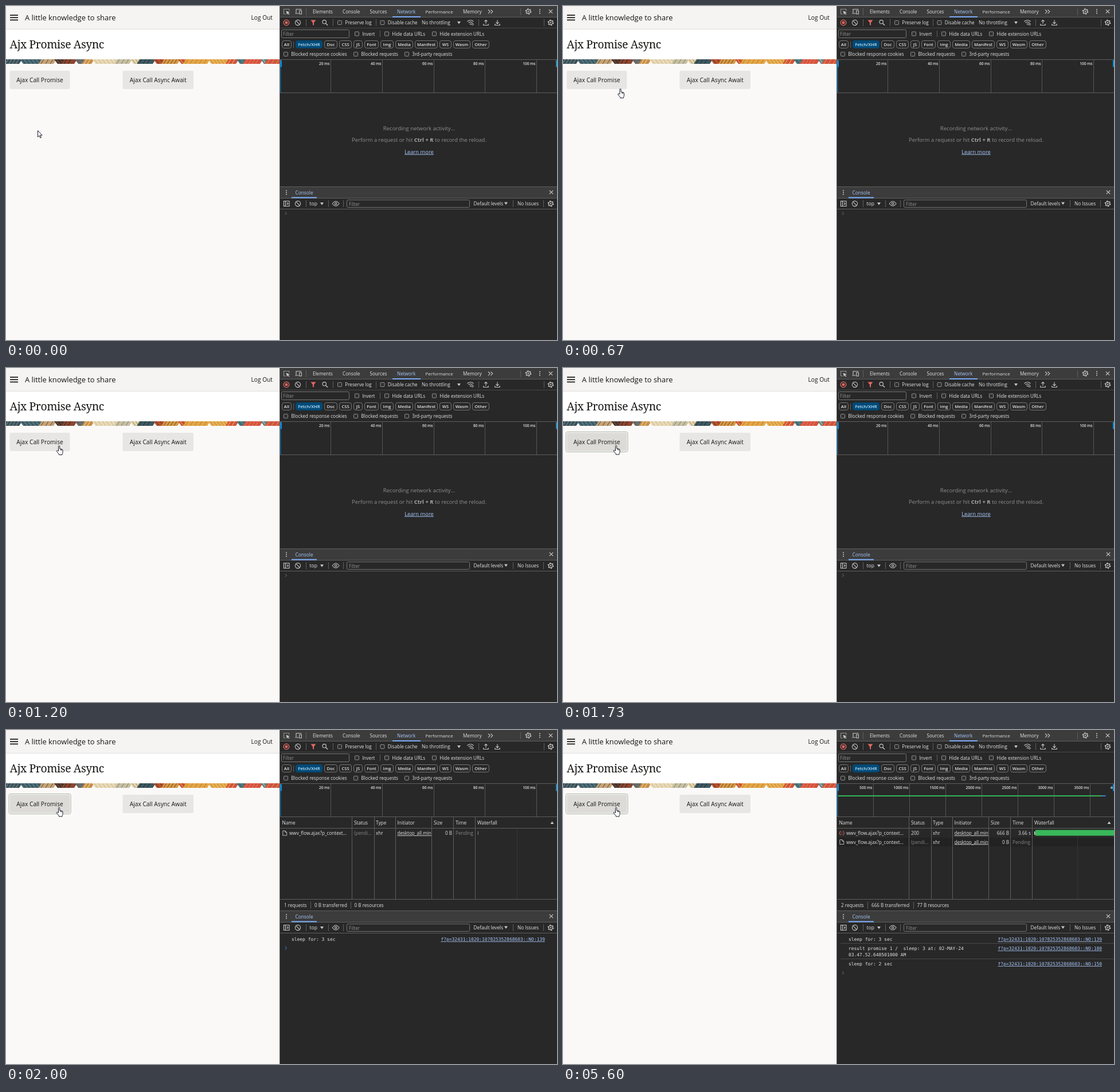
Recreate the animation shown at these times as an HTML page. Size 961 by 583 pixels, loop 8000 ms.

```html
<!DOCTYPE html>
<html lang="en">
<head>
<meta charset="utf-8">
<title>Ajx Promise Async</title>
<style>
html, body { margin: 0; width: 100%; height: 100%; overflow: hidden; background: #282828; }
svg { display: block; width: 100%; height: 100%; }
text { font-family: "Open Sans", "Noto Sans", sans-serif; white-space: pre; }
.serif { font-family: "Noto Serif", "Liberation Serif", serif; letter-spacing: -.38px; }
.mono { font-family: "DejaVu Sans Mono", "Liberation Mono", monospace; }
.link { text-decoration: underline; }
</style>
</head>
<body>
<svg id="stage" viewBox="0 0 961 583" xmlns="http://www.w3.org/2000/svg"></svg>
<script>
const LOOP = 8000;
const INK = '#161513', PANEL = '#282828', BAR = '#3c3c3c', LINE = '#5e5e5e';
const FG = '#e3e3e3', ICON = '#c7c7c7', DIM = '#8f8f8f', BLUE = '#7cacf8', LINK = '#a8c7fa', RED = '#e46962';

// markup helpers
const rect = (x, y, w, h, fill, more = '') =>
  `<rect x="${x}" y="${y}" width="${w}" height="${h}" fill="${fill}" ${more}/>`;
const hline = (x, y, w, c = LINE) => rect(x, y, w, 1, c);
const vline = (x, y, h, c = LINE) => rect(x, y, 1, h, c);
const text = (x, y, s, { size = 8.15, fill = FG, anchor = 'start', weight = 400, cls = '' } = {}) =>
  `<text x="${x}" y="${y}" font-size="${size}" fill="${fill}" text-anchor="${anchor}" font-weight="${weight}" class="${cls}">${s}</text>`;
const stroke = (d, c = ICON, w = 1.1, fill = 'none') =>
  `<path d="${d}" fill="${fill}" stroke="${c}" stroke-width="${w}"/>`;
const shape = (d, c = ICON) => `<path d="${d}" fill="${c}"/>`;
const ring = (x, y, r, c = ICON, w = 1.1, more = '') =>
  `<circle cx="${x}" cy="${y}" r="${r}" fill="none" stroke="${c}" stroke-width="${w}" ${more}/>`;
const group = (id, body) => `<g id="${id}">${body}</g>`;

// icons
const gear = (x, y) => ring(x, y, 3.6, ICON, 1.2) + ring(x, y, 4.7, ICON, 1.3, 'stroke-dasharray="2.2 2.72"') + ring(x, y, 1.1, ICON, 1);
const dots = (x, y) => [-3.3, 0, 3.3].map(d => `<circle cx="${x}" cy="${y + d}" r="1" fill="${ICON}"/>`).join('');
const cross = (x, y) => stroke(`M${x - 3.2} ${y - 3.2}l6.4 6.4m0-6.4l-6.4 6.4`, ICON, 1.2);
const clear = (x, y) => ring(x, y, 4.6) + stroke(`M${x - 3.2} ${y - 3.2}l6.4 6.4`);
const caret = (x, y) => shape(`M${x - 3} ${y - 2}h6l-3 4.4z`);
const box = (x, y) => rect(x - 3.5, y - 3.5, 7, 7, '#303030', `rx="1" stroke="${DIM}"`);
const check = (x, y, label) => box(x, y) + text(x + 9.3, y + 3.2, label);
const arrowTray = (x, y, dir) =>
  stroke(`M${x - 4.2} ${y + 2}v2.5h8.4v-2.5M${x} ${y + 2}v-6.5` +
    (dir < 0 ? `m-2.6 2.7l2.6-2.7l2.6 2.7` : `m-2.6 3.9l2.6 2.6l2.6-2.6`));
const prompt = (id, y, c) => group(id, stroke(`M487 ${y - 2.6}l2.5 2.6l-2.5 2.6`, c, 1));
const fileIcon = y => stroke(`M482.8 ${y - 4}h4.2l2.7 2.7v5.3h-6.9zM487 ${y - 4}v2.7h2.7`, ICON, .9);
const jsonIcon = y => stroke(`M484.6 ${y - 3.6}q-1.5 0-1.4 1.5t-1.3 2.1q1.4.4 1.3 2t1.4 1.6M488.2 ${y - 3.6}q1.5 0 1.4 1.5t1.3 2.1q-1.4.4-1.3 2t-1.4 1.6`, RED, 1) +
  rect(485.8, y - 2, 1.2, 1.3, RED) + rect(485.8, y + 1, 1.2, 1.3, RED);

// decorative strip: [start, colour, hatch colour]
const STRIP = [
  [-6, '#3d5058', '#6f8a8c'], [24, '#4f7079', '#2f3f47'], [62, '#c4a57a', '#7e5c3c'], [84, '#43352f', '#8a4a31'],
  [102, '#8d4630', '#3b2d29'], [120, '#5b7478', '#a5472f'], [137, '#c98f45', '#e6d3a4'], [150, '#e8dab8', '#d0bc8e'],
  [194, '#c8c0a4', '#8f8f78'], [216, '#e6d6b0', '#b39a6a'], [233, '#3f5960', '#27383f'], [257, '#b5532f', '#7b3326'],
  [276, '#d69a45', '#8e5a2c'], [300, '#c64f35', '#e2a44a'], [314, '#e2a747', '#c9822f'], [352, '#e6b256', '#d08935'],
  [388, '#d0533c', '#edb05c'], [402, '#4f7c80', '#365b63'], [418, '#d5533f', '#e8795a'], [444, '#5c8585', '#c9c0a5'], [456, '#cf5340', '#e48a4e']
];
function strip() {
  let out = '';
  STRIP.forEach(([x, base, hatch], i) => {
    const end = i + 1 < STRIP.length ? STRIP[i + 1][0] : 486;
    const lean = i % 2 ? 6 : -5;
    out += shape(`M${x} 93H${end + 4}l${lean} 8H${x + lean}z`, base);
    for (let k = x + 4; k < end - 1; k += 6 + i % 3)
      out += stroke(`M${k} 93l${lean} 8`, hatch, 1.2);
  });
  return `<svg x="0" y="93" width="477" height="8" viewBox="0 93 477 8">${out}</svg>`;
}

const button = (x, w, fill, label) => rect(x, 113, w, 32, fill, 'rx="2"') +
  text(x + w / 2, 132.5, label, { size: 10.2, fill: INK, anchor: 'middle', weight: 500 });

function page() {
  return rect(0, 0, 477, 583, '#fbf9f8') + rect(0, 0, 477, 40, '#f5f4f2') + hline(0, 40, 477, '#e1dfdc') +
    rect(0, 41, 477, 52, '#fff') + strip() +
    [15.2, 19.4, 23.6].map(y => rect(7, y, 14, 1.7, INK)).join('') +
    text(33, 25, 'A little knowledge to share', { size: 12.9, fill: INK, weight: 500 }) +
    text(427.5, 24, 'Log Out', { size: 10.2, fill: INK }) +
    text(6.5, 74, 'Ajx Promise Async', { size: 19.3, fill: INK, cls: 'serif' }) +
    button(6.5, 105, '#e7e6e4', 'Ajax Call Promise') + button(203.5, 123.5, '#e7e6e4', 'Ajax Call Async Await') +
    group('pressed', rect(5, 111.5, 108, 35, '#fff', 'rx="3" stroke="#a9b3a0"') + button(6.5, 105, '#dddbd8', 'Ajax Call Promise'));
}

function toolbars() {
  const tabs = [[535, 'Elements'], [587, 'Console'], [634.5, 'Sources'], [682, 'Network'], [731.5, 'Performance', 7.95], [797, 'Memory', 8.35]];
  const pills = [[481, 17, 'All'], [505, 47, 'Fetch/XHR'], [555, 23, 'Doc'], [581, 22, 'CSS'], [606, 16, 'JS'], [625, 25, 'Font'],
    [653, 23, 'Img'], [679, 31, 'Media'], [713, 40, 'Manifest'], [756, 21, 'WS'], [780, 30, 'Wasm'], [813, 30, 'Other']];
  return rect(477, 0, 484, 583, PANEL) + rect(477, 0, 484, 19, BAR) + hline(477, 19, 484) + vline(477, 0, 583) +
    tabs.map(([x, s, size]) => text(x, 13, s, { size, fill: s === 'Network' ? LINK : FG })).join('') +
    rect(674, 18, 49, 2, BLUE) +
    stroke('M494 8V5.5H484.5V14H488', ICON, 1.1).replace('/>', ' stroke-dasharray="1.6 1"/>') + shape('M488.5 8.5l6.5 2.4-2.8 1 2.3 2.3-1 1-2.3-2.3-1 2.4z') +
    stroke('M506 12V5.8h9.5M504.3 13h6.2M511.8 8h3.6v6h-3.6z') + vline(523, 4, 12) +
    stroke('M841 6.5l3.3 3.3-3.3 3.3M845.5 6.5l3.3 3.3-3.3 3.3') + vline(897, 4, 12) + gear(911, 9.5) + dots(931, 9.5) + cross(950, 9.5) +
    // network toolbar
    ring(489, 29, 4.8, RED, 1.3) + rect(486.8, 26.8, 4.4, 4.4, RED) + clear(509, 29) + vline(523, 23, 12) +
    shape('M531.5 24.5h9l-3.5 4.6v4.9l-2-1.2v-3.7z', RED) + ring(555.2, 27.8, 3.2) + stroke('M557.5 30.2l3.6 3.6', ICON, 1.4) + vline(570, 23, 12) +
    check(582, 29, 'Preserve log') + vline(645, 23, 12) + check(656.5, 29, 'Disable cache') +
    text(725, 32.2, 'No throttling', { size: 8.4 }) + caret(790, 29) +
    stroke('M804.5 27q5.5-4.5 11 0M806.5 29.3q3.5-2.8 7 0', ICON, 1.2) + shape('M808.4 31q1.6-1 3.2 0l-1.6 1.8z') + ring(813.6, 31.8, 1.6, ICON, 1) +
    vline(824, 23, 12) + arrowTray(837, 29, -1) + arrowTray(857, 29, 1) + vline(938, 23, 12) + gear(950, 29) + hline(477, 38, 484, '#474747') +
    // filters
    rect(480.5, 41.5, 118, 14, PANEL, `rx="2" stroke="#757575"`) + text(483, 52.2, 'Filter', { fill: DIM }) +
    check(612, 48.5, 'Invert') + vline(652, 43, 11) + check(664, 48.5, 'Hide data URLs') + check(747, 48.5, 'Hide extension URLs') +
    pills.map(([x, w, s], i) => rect(x + .5, 60.5, w - 1, 13, i === 1 ? '#004a77' : 'none', `rx="3.5" stroke="${i === 1 ? '#004a77' : '#757575'}"`) +
      text(x + w / 2, 70, s, { size: 7.6, anchor: 'middle', weight: 600, fill: i === 1 ? '#c2e7ff' : FG })).join('') +
    vline(501, 62, 11) +
    check(488, 84, 'Blocked response cookies') + check(610, 84, 'Blocked requests') + check(699, 84, '3rd-party requests') +
    hline(477, 93, 484);
}

const ticks = (id, first, gap, labels) => group(id, labels.map((s, i) => {
  const x = Math.round(first + i * gap);
  return (x < 961 ? vline(x, 94, 57, '#555') : '') +
    text(x - 1.5, 103.4, s, { size: 6.5, anchor: 'end', weight: 600 });
}).join(''));

function overview() {
  return ticks('ticksShort', 566, 89.8, ['20 ms', '40 ms', '60 ms', '80 ms', '100 ms']) +
    ticks('ticksLong', 540.5, 63, [1, 2, 3, 4, 5, 6, 7, 8].map(n => n * 500 + ' ms')) +
    group('load', rect(480, 114, 460, 2, '#36b355') + rect(939, 114, 7.5, 2, '#3f7fd0')) +
    rect(478, 94, 1.3, 58, '#0b79b8') + rect(478, 94.5, 3, 12, '#0b8fd8', 'rx="1"') + rect(959, 94.5, 2, 12, '#0b8fd8') +
    hline(477, 151, 484);
}

const hint = () => group('hint',
  text(720.5, 217, 'Recording network activity…', { size: 9.6, fill: DIM, anchor: 'middle' }) +
  text(720.5, 237.3, 'Perform a request or hit <tspan font-weight="700" fill="#a8a8a8">Ctrl + R</tspan> to record the reload.', { size: 9.45, fill: DIM, anchor: 'middle' }) +
  text(720.5, 257.7, 'Learn more', { size: 9.4, fill: LINK, anchor: 'middle', cls: 'link' }));

function requestRow(id, y, done) {
  const b = y + 3;
  const gray = { fill: '#858585' };
  return group(id, (done ? jsonIcon(y) : fileIcon(y)) + text(494, b, 'wwv_flow.ajax?p_context…') +
    text(607, b, done ? '200' : '(pendi…', done ? {} : gray) + text(645, b, 'xhr') +
    text(682.5, b, 'desktop_all.min', { size: 8.1, cls: 'link' }) +
    text(778, b, done ? '666 B' : '0 B', { anchor: 'end' }) +
    text(done ? 816 : 784, b, done ? '3.66 s' : 'Pending', done ? { anchor: 'end' } : gray) +
    (done ? rect(822, y - 3, 1.5, 6, FG) + rect(824, y - 5.5, 137, 10, '#38b95a') : ''));
}

const summary = (id, moved, size, sep) => group(id, text(538, 309.3, moved) + vline(sep, 300, 12) + text(sep + 6.5, 309.3, size));

function table() {
  const heads = [[481.5, 'Name'], [607, 'Status'], [645, 'Type'], [682.5, 'Initiator'], [746, 'Size'], [784, 'Time'], [822, 'Waterfall']];
  return group('table',
    hline(477, 171, 484) + heads.map(([x, s]) => text(x, 165, s, { size: 8.3 })).join('') + shape('M949.5 164h6l-3-4.4z') +
    group('stripe', rect(478, 188, 483, 15, '#222')) +
    group('markA', vline(891, 172, 124, '#353535') + rect(823, 177, 1, 6, '#8a8a8a')) +
    group('markB', vline(897, 172, 124, '#353535')) +
    [603, 642, 679, 742, 780, 818].map(x => vline(x, 152, 144)).join('') +
    requestRow('pendingA', 180, false) + requestRow('doneA', 180, true) + requestRow('pendingB', 195.5, false) +
    hline(477, 295, 484) + text(485, 309.3, '<tspan id="count">1</tspan> requests') + vline(531, 300, 12) +
    summary('sumA', '0 B transferred', '0 B resources', 601) + summary('sumB', '666 B transferred', '77 B resources', 611));
}

const mono = (x, y, s, o = {}) => text(x, y, s, { size: 7.95, cls: 'mono', ...o });
const log = (y, s, line) => mono(498, y, s) +
  mono(940, y, 'f?p=32431:1020:107825352868603::NO:' + line, { anchor: 'end', fill: LINK, cls: 'mono link' });

function drawer() {
  return rect(478, 316, 483, 19, BAR) + hline(477, 315, 484) + hline(477, 335, 484) + dots(489, 325.5) +
    text(504.5, 328.7, 'Console', { fill: LINK, size: 8.3 }) + rect(498, 333.5, 44, 2, BLUE) + cross(951, 325) +
    stroke('M484.5 340.5h9.5v9h-9.5zM487.5 340.5v9M489.8 343l2.2 2-2.2 2') + clear(509, 345) + vline(523, 339, 12) +
    text(529.5, 348.2, 'top', { size: 8.6 }) + caret(551, 345) + vline(562, 339, 12) +
    stroke('M569.3 345q5.9-8 11.8 0q-5.9 8-11.8 0z') + ring(575.2, 345, 1.7) + vline(588, 339, 12) +
    rect(594.5, 338.5, 214, 13, PANEL, `rx="2" stroke="#757575"`) + text(598, 348.5, 'Filter', { fill: DIM }) +
    text(815.5, 348.2, 'Default levels', { size: 8.25 }) + caret(872, 344.5) + vline(884, 339, 12) +
    text(892, 348.2, 'No Issues', { size: 8.25 }) + vline(937, 339, 12) + gear(950, 345) + hline(477, 354, 484) +
    prompt('promptA', 362, '#757575') + prompt('promptB', 380.7, '#4c8df6') + prompt('promptC', 424, '#757575') +
    group('logA', log(368, 'sleep for: 3 sec', 139)) +
    group('logB', hline(484, 372, 477, '#474747') + log(384, 'result promise 1 /  sleep: 3 at: 02-MAY-24', 180) +
      mono(498, 394.7, '03.47.52.648501000 AM') + hline(484, 399, 477, '#474747') + log(411, 'sleep for: 2 sec', 150));
}

const cursors = () =>
  group('arrow', stroke('M.5 .5V11.6L3 9.3l1.8 4 1.7-.8-1.8-3.8h3.4z', '#1b1b2a', 1, '#fff')) +
  group('hand', stroke('M4 10V2q0-1.4 1.1-1.4T6.2 2v4l3.9.8q1.4.4 1.4 1.8v3.6q0 1.8-1 3v1.3H4.8v-1.2L1 10.6q-.6-1 .2-1.5 1-.4 1.8.5zM7.9 6.5v2.3M9.7 7v2', '#1b1b2a', 1, '#fff'));

const $ = id => document.getElementById(id);
$('stage').innerHTML = page() + toolbars() + overview() + hint() + table() + drawer() + cursors();

// [time, x, y, pointer]
const PATH = [
  [0, 55, 217, 'arrow'], [70, 51, 212, 'arrow'], [140, 43, 200, 'arrow'], [200, 36, 185, 'arrow'], [270, 38, 168, 'arrow'],
  [330, 48, 153, 'arrow'], [400, 58.5, 145, 'arrow'], [470, 69, 142, 'hand'], [540, 80, 141, 'hand'], [600, 89, 142, 'hand'],
  [670, 95, 144, 'hand'], [730, 94, 146, 'arrow'], [800, 92, 146, 'arrow'], [870, 89, 146, 'arrow'],
  [930, 85, 144, 'hand'], [1000, 85, 142, 'hand'], [1200, 87.5, 135, 'hand'], [1730, 87.5, 134.5, 'hand']
];

// visible from / until
const SPANS = {
  pressed: [1730, LOOP], hint: [0, 2000], table: [2000, LOOP],
  ticksShort: [0, 5530], ticksLong: [5530, LOOP], load: [5530, LOOP],
  markA: [2000, 5530], markB: [5530, LOOP], pendingA: [2000, 5530], doneA: [5530, LOOP],
  stripe: [5600, LOOP], pendingB: [5600, LOOP], sumA: [2000, 5530], sumB: [5530, LOOP],
  logA: [1930, LOOP], logB: [5530, LOOP],
  promptA: [0, 1930], promptB: [1930, 5530], promptC: [5530, LOOP]
};

const show = (id, on) => { $(id).style.display = on ? '' : 'none'; };

function render(t) {
  for (const [id, [from, to]] of Object.entries(SPANS)) show(id, t >= from && t < to);
  const [, x, y, pointer] = PATH.findLast(step => step[0] <= t);
  for (const id of ['arrow', 'hand']) show(id, id === pointer);
  $(pointer).setAttribute('transform', `translate(${x} ${y})`);
  $('count').textContent = t < 5600 ? 1 : 2;
}

const start = performance.now();
function tick() {
  render((performance.now() - start) % LOOP);
  requestAnimationFrame(tick);
}
tick();
</script>
</body>
</html>
```
